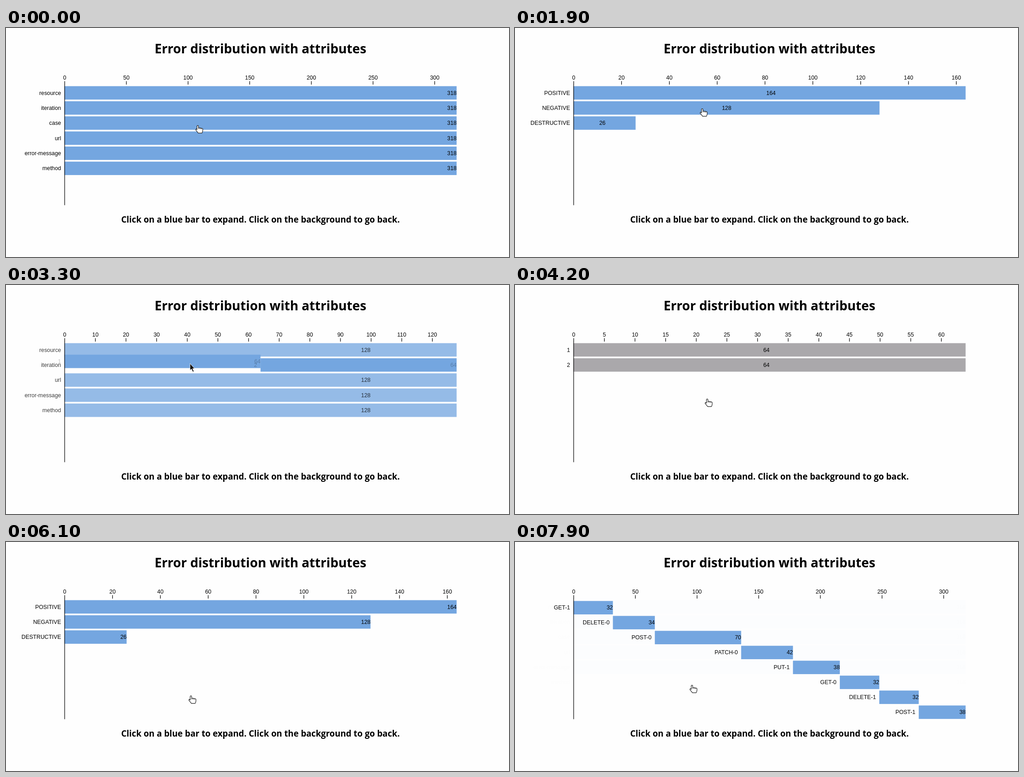
Write an HTML page that moves like this. It is 1107 by 506 pixels and loops after 8000 ms.

```html
<!DOCTYPE html>
<html lang="en">
<head>
<meta charset="utf-8">
<title>Error distribution</title>
<style>
  html, body { margin: 0; width: 100%; height: 100%; overflow: hidden; background: #fefefe; }
  svg { display: block; width: 1107px; height: 506px; }
  text { font: 12.35px "Liberation Sans", Arial, sans-serif; }
  .head { font: 700 28.2px "Open Sans", "Noto Sans", sans-serif; text-anchor: middle; }
  .hint { font: 700 18.75px "Open Sans", "Noto Sans", sans-serif; text-anchor: middle; }
  .bars { text-anchor: end; }
  .axis { text-anchor: middle; }
  .axis path, .y { stroke: #000; stroke-width: 1.235; }
</style>
</head>
<body>
<svg viewBox="0 0 1107 506">
  <text class="head" x="560" y="56">Error distribution with attributes</text>
  <text class="hint" x="560" y="430">Click on a blue bar to expand. Click on the background to go back.</text>
  <g id="chart"></g>
  <path class="y" d="M129.1 124.8V391.6"/>
  <g id="hand" fill="#fff" stroke="#222" stroke-width="1.2" stroke-linejoin="round">
    <path d="M-1.6 9.5V2A1.6 1.6 0 0 1 1.6 2V6Q3.2 5 4.8 6.2Q6.4 5.4 7.8 6.8Q10 6.2 11 8V11.5Q11 14 9.2 17.2H1Q-1 14.5 -4.4 10.4Q-4.9 8 -3 8.2Z"/>
    <path d="M1.6 6V8.6M4.8 6.2V8.8M7.8 6.8V9" stroke-width=".9"/>
  </g>
  <path id="arrow" d="M0 0V15L3.3 12.1L6 18.5L8.5 17.4L5.8 11.2H10Z" fill="#111" stroke="#fff" stroke-width=".8"/>
</svg>
<script>
const LOOP = 8000, TICK = 100, PHASE = 300;
const LEFT = 128.6, WIDTH = 863.1, TOP = 124.8, UNIT = 1.2353;
const STEP = 27 * UNIT, BAR = 24 * UNIT, PAD = 3 * UNIT;
const BLUE = [116, 166, 224], GREY = [170, 168, 171];

const node = (max, step, names, values, leaf = false) => ({
  max, step, leaf,
  rows: names.split(' ').map((name, i) => ({ name, value: values ? values[i] : max }))
});
const root = node(318, 50, 'resource iteration case url error-message method');
const cases = node(164, 20, 'POSITIVE NEGATIVE DESTRUCTIVE', [164, 128, 26]);
const negative = node(128, 10, 'resource iteration url error-message method');
const iteration = node(64, 5, '1 2', null, true);
const method = node(318, 50, 'GET-1 DELETE-0 POST-0 PATCH-0 PUT-1 GET-0 DELETE-1 POST-1',
  [32, 34, 70, 42, 38, 32, 32, 38]);

// start time, view left, view entered, row of the parent bar, direction
const moves = [
  [-LOOP, cases, root, 2, 'up'],
  [880, root, cases, 2, 'down'],
  [2050, cases, negative, 1, 'down'],
  [3183, negative, iteration, 1, 'down'],
  [4300, iteration, negative, 1, 'up'],
  [5460, negative, cases, 1, 'up'],
  [6345, cases, root, 2, 'up'],
  [7642, root, method, 5, 'down']
].map(([at, from, to, row, dir]) => ({ at, from, to, row, dir }));

// Values are placed with the scale in force when their bars are created.
let anchor = cases.max;
for (const m of moves) {
  m.outAnchor = anchor;
  anchor = m.inAnchor = m.dir === 'up' ? m.to.max : m.from.max;
}

// time, tip x, tip y
const pointer = [
  [0, 422, 215], [1100, 418, 203], [1200, 413, 184], [1900, 412, 178], [2000, 408, 171],
  [2100, 405, 167], [3000, 405, 171.5], [3200, 405, 173.5], [4200, 423, 251.5],
  [5100, 415, 295], [5200, 408, 330], [5400, 407, 339.5],
  [7400, 401, 333], [7500, 394, 325], [7600, 389.5, 316]
];
const arrowFrom = 3200, arrowTo = 4000;

const lerp = (a, b, p) => a + (b - a) * p;
const clamp = p => Math.min(1, Math.max(0, p));
const ease = p => p < .5 ? 4 * p ** 3 : 1 - 4 * (1 - p) ** 3;
const px = (value, max) => value / max * WIDTH;
const mix = p => `rgb(${BLUE.map((c, i) => Math.round(lerp(c, GREY[i], p)))})`;
const lastBefore = (list, t, time) => list.filter(item => time(item) <= t).pop();

// place(value, sum of earlier values, index) gives x, y (in rows) and width
function bars(view, place, { anchor, text, rect = 1, hidden = -1, grey = 0 }) {
  let sum = 0;
  const fill = mix(view.leaf ? grey : 0);
  const items = view.rows.map(({ name, value }, i) => {
    const { x, y, w } = place(value, sum, i);
    const base = BAR / 2 + 4.3;
    sum += value;
    return `<g transform="translate(${LEFT + x} ${TOP + PAD + y * STEP})">
      <text x="${-6 * UNIT}" y="${base}">${name}</text>
      <rect width="${w}" height="${BAR}" fill="${fill}" fill-opacity="${i === hidden ? 0 : rect}"/>
      <text x="${px(value, anchor)}" y="${base}">${value}</text></g>`;
  });
  return `<g class="bars" fill-opacity="${text}">${items.join('')}</g>`;
}

const resting = max => (value, sum, i) => ({ x: 0, y: i, w: px(value, max) });

function axis(from, to, p) {
  const ticks = v => Array.from({ length: Math.floor(v.max / v.step) + 1 }, (_, i) => i * v.step);
  const before = ticks(from), after = ticks(to);
  const marks = [...new Set([...before, ...after])].map(v => {
    const opacity = !after.includes(v) ? 1 - p : !before.includes(v) ? p : 1;
    const x = LEFT + UNIT / 2 + lerp(px(v, from.max), px(v, to.max), p);
    return opacity <= 0 ? '' : `<g transform="translate(${x} ${TOP})" opacity="${opacity}">
      <path d="M0 .3V${-6 * UNIT}"/><text y="${-9 * UNIT}">${v}</text></g>`;
  });
  return `<g class="axis">${marks.join('')}</g>`;
}

function down({ from, to, row, inAnchor, outAnchor }, p1, p2) {
  const enter = (value, sum, i) => ({
    x: lerp(px(sum, from.max), 0, p2),
    y: lerp(row, i, p1),
    w: lerp(px(value, from.max), px(value, to.max), p2)
  });
  const fade = 1 - p1;
  return axis(from, to, p2)
    + (fade > 0 ? bars(from, resting(from.max), { anchor: outAnchor, text: fade, rect: fade, hidden: row }) : '')
    + bars(to, enter, { anchor: inAnchor, text: p1, grey: p2 });
}

function up({ from, to, row, inAnchor, outAnchor }, p1, p2) {
  const exit = (value, sum, i) => ({
    x: lerp(0, px(sum, to.max), p1),
    y: lerp(i, row, p2),
    w: lerp(px(value, from.max), px(value, to.max), p1)
  });
  const busy = p2 < 1;
  return axis(from, to, p1)
    + bars(to, resting(to.max), { anchor: inAnchor, text: p2, rect: p2, hidden: busy ? row : -1 })
    + (busy ? bars(from, exit, { anchor: outAnchor, text: 1 - p2, grey: 1 - p1 }) : '');
}

const [chart, hand, arrow] = ['chart', 'hand', 'arrow'].map(id => document.getElementById(id));

function draw(t) {
  const move = lastBefore(moves, t, m => m.at);
  const p = (t - move.at) / PHASE;
  chart.innerHTML = (move.dir === 'up' ? up : down)(move, ease(clamp(p)), ease(clamp(p - 1)));

  const [, x, y] = lastBefore(pointer, t, k => k[0]);
  const isArrow = t >= arrowFrom && t < arrowTo;
  for (const el of [hand, arrow]) {
    el.setAttribute('transform', `translate(${x} ${y})`);
    el.setAttribute('visibility', (el === arrow) === isArrow ? 'visible' : 'hidden');
  }
}

// The picture advances in steps of TICK, like a screen recording.
const start = performance.now();
let shown = -1;
function loop() {
  const t = Math.floor((performance.now() - start) % LOOP / TICK) * TICK;
  if (t !== shown) draw(shown = t);
  requestAnimationFrame(loop);
}
loop();
</script>
</body>
</html>
```
